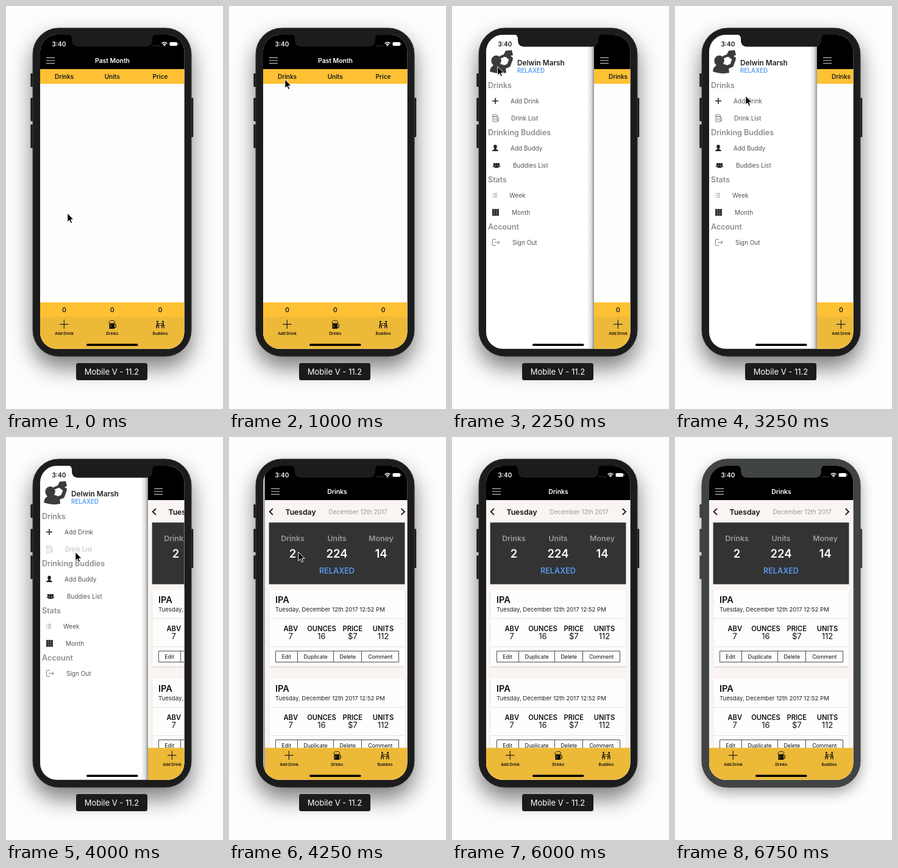
An HTML page that plays this animation: 356 px wide and 658 px high, repeating every 7.25 s.

```html
<!DOCTYPE html>
<html lang="en">
<head>
<meta charset="utf-8">
<title>Drink tracker demo</title>
<style>
  html, body { margin: 0; width: 100%; height: 100%; overflow: hidden; background: #fdfdfd; }
  svg { display: block; width: 356px; height: 658px; font-family: Inter, Roboto, "Liberation Sans", sans-serif; }
</style>
</head>
<body>
<svg id="stage" viewBox="0 0 356 658" xmlns="http://www.w3.org/2000/svg"></svg>
<script>
const LOOP = 7250, STEP = 250, OPEN = 177;
const YELLOW = '#fec133', INK = '#111';

const text = (x, y, size, str, { weight = 400, fill = INK, anchor = 'middle' } = {}) =>
  `<text x="${x}" y="${y}" font-size="${size}" font-weight="${weight}" fill="${fill}" text-anchor="${anchor}">${str}</text>`;
const left = (x, y, size, str, style) => text(x, y, size, str, { ...style, anchor: 'start' });
const rect = (x, y, w, h, fill, more = '') =>
  `<rect x="${x}" y="${y}" width="${w}" height="${h}" fill="${fill}" ${more}/>`;
const line = (d, stroke, width = 1, more = '') =>
  `<path d="${d}" fill="none" stroke="${stroke}" stroke-width="${width}" ${more}/>`;
const shape = (d, fill, more = '') => `<path d="${d}" fill="${fill}" ${more}/>`;
const group = (body, more = '') => `<g ${more}>${body}</g>`;
const at = (x, y, body) => group(body, `transform="translate(${x} ${y})"`);
const row = (centers, labels, draw) => labels.map((label, i) => draw(centers[i], label)).join('');

const COLS = [95.5, 174.2, 253];

// Icons, each centred on its own origin
const person = shape('M-5 5q0-2.3 3.4-3.1v-1.2q-1.2-1-1.2-3.1q0-3 2.8-3t2.8 3q0 2.1-1.2 3.1v1.2q3.4.8 3.4 3.1z', '#222');
const icons = {
  plus: (r, w) => line(`M${-r} 0H${r}M0 ${-r}V${r}`, '#222', w),
  mug: shape('M-4.500-1.500h8.500v8.500h-8.500z', INK) +
    line('M4-.5h1.2q1 0 1 1v3.500q0 1-1 1H4', INK, 1.2) +
    line('M-4.500-1.500q-2.500-2.500.5-3.500q1-2 3.500-1.300q3-1 4.500 1q2 1 0 3.300z', INK, .9) +
    line('M-2 .5v4.500', '#d8a62f', .6),
  mugOutline: line('M-4-2.5h7.5v8.5h-7.5zM3.5-.5h2v5h-2M-1.7-.5v4.5M1.2-.5v4.5M-4.5-3q-1.2-2.8 1.4-2.6q2.6-1.6 4.4 0q3.2 0 2.2 2.6z', '#777', .9),
  buddies: [-1, 1].map(s => group(
    `<circle cx="-4.6" cy="-4.5" r="1.4" fill="${INK}"/>` +
    line('M-5.2-2.600V2H-3L-2.600 6.200M-5.800 1L-6.200 6.200M-5-1.8L-2.8-.6L-.9-2', INK, 1.3),
    `transform="scale(${s} 1)"`)).join('') + line('M-2 1.5H2', INK, .8),
  person,
  people: group(person, 'transform="translate(-3.6 -.3) scale(.62)"') +
    group(person, 'transform="translate(3.6 -.3) scale(.62)"') +
    group(person, 'transform="translate(0 .4) scale(.78)"'),
  list: [-3, 0, 3].map(y => line(`M-4 ${y}h1.2M-1.5 ${y}h5.5`, '#777', .9)).join(''),
  grid: rect(-5.5, -5.5, 11, 11, '#222') + line('M-5.5-2H5.5M-5.5 2H5.5M-2-5.5V5.5M2-5.5V5.5', '#aaa', .5),
  exit: line('M0-5h-4.5q-1.2 0-1.2 1.2v7.6q0 1.2 1.2 1.2H0M-2 0H6M3.5-2.5L6 0L3.5 2.5', '#666', .9),
};

function drawMenu() {
  const head = (y, label) => left(59, y, 12.5, label, { weight: 600, fill: '#8e8e8e' });
  const item = (x, y, label, iconX, icon, id = '') => group(
    at(iconX, y - 4, icon) + left(x, y, 10, label, { fill: '#555' }), id);
  const drinker =
    shape('M62 107q1-8 6-10q-5-5-3-11q3-6 10-5q5 2 6 8l-2 6q6 0 9 5l1 9q-14 3-27-2z', '#3b3b3b') +
    line('M80 102L93 97L97 86L91 82', '#3b3b3b', 6, 'stroke-linejoin="round"') +
    shape('M78 82l7-3l3-6l10-1l2 8l-9 4l-5-1l-7 3z', '#3b3b3b');
  return rect(56, 47, 237, 513, '#fff') + drinker +
    left(107, 96.5, 11.8, 'Delwin Marsh', { weight: 600, fill: '#222' }) +
    left(107, 109, 9.8, 'RELAXED', { weight: 600, fill: '#5a9df2' }) +
    head(134, 'Drinks') +
    item(96, 159, 'Add Drink', 71, icons.plus(5, 1.6)) +
    item(97, 187, 'Drink List', 71, icons.mugOutline, 'id="drinkList"') +
    head(211, 'Drinking Buddies') +
    item(96, 236, 'Add Buddy', 71, icons.person) +
    item(100, 264, 'Buddies List', 73, icons.people) +
    head(288, 'Stats') +
    item(94, 313, 'Week', 70, icons.list) +
    item(98, 341, 'Month', 71.5, icons.grid) +
    head(365, 'Account') +
    item(99, 390, 'Sign Out', 72, icons.exit);
}

function drawMonth() {
  const bold = { weight: 600, fill: '#1c1c1c' };
  return rect(56, 103, 237, 457, '#fefefe') +
    rect(56, 103, 237, 24, YELLOW) +
    row(COLS, ['Drinks', 'Units', 'Price'], (x, s) => text(x, 118.5, 10, s, bold)) +
    rect(56, 484, 237, 24, YELLOW) +
    row(COLS, ['0', '0', '0'], (x, s) => text(x, 499.5, 10.4, s, bold)) +
    text(174.5, 93, 10.4, 'Past Month', { weight: 600, fill: '#fff' });
}

function drawCard(y) {
  const facts = [98.3, 149, 199.8, 250], buttons = [91, 139, 191.8, 245.3];
  return at(0, y,
    rect(63.5, 1, 221.5, 126, '#000', 'opacity=".1" filter="url(#soft)"') +
    rect(63.5, 0, 221.5, 125, '#fdfdfc') +
    left(73, 22.3, 14.6, 'IPA', { weight: 600 }) +
    left(73, 35.5, 9.6, 'Tuesday, December 12th 2017 12:52 PM', { fill: '#222' }) +
    line('M64 47.5H285M64 93.5H285', '#e6e4e3') +
    row(facts, ['ABV', 'OUNCES', 'PRICE', 'UNITS'], (x, s) => text(x, 68, 11.2, s, { weight: 600 })) +
    row(facts, ['7', '16', '$7', '112'], (x, s) => text(x, 81, 13, s)) +
    line('M73.5 100.5H275.5V118.5H73.5ZM109.5 100V118M168.5 100V118M214.5 100V118', '#3c3c3c', .9) +
    row(buttons, ['Edit', 'Duplicate', 'Delete', 'Comment'], (x, s) => text(x, 112.7, 8.8, s)));
}

function drawDrinks() {
  const cols = [101.5, 174, 246.5];
  return rect(56, 103, 237, 457, '#faf4f2') +
    line('M69 116.8L63.6 122L69 127.2M279.6 116.8L285 122L279.6 127.2', '#111', 1.8) +
    left(89.5, 127, 12.2, 'Tuesday', { weight: 600 }) +
    left(160.5, 126, 10, 'December 12th 2017', { fill: '#999' }) +
    rect(62.6, 139.6, 222.8, 100.8, '#333') +
    row(cols, ['Drinks', 'Units', 'Money'], (x, s) => text(x, 169.5, 12.4, s, { weight: 600, fill: '#999' })) +
    row(cols, ['2', '224', '14'], (x, s) => text(x, 197, 18.4, s, { weight: 600, fill: '#fff' })) +
    text(174, 223, 12.6, 'RELAXED', { weight: 600, fill: '#5b97ec' }) +
    drawCard(249) + drawCard(394) +
    text(174.5, 93, 10.4, 'Drinks', { weight: 600, fill: '#fff' });
}

function drawContent() {
  return rect(44, 47, 12, 513, 'url(#edge)', 'id="edgeShadow"') +
    rect(56, 47, 237, 56, '#000') +
    group(drawMonth(), 'id="month"') + group(drawDrinks(), 'id="drinks"') +
    line('M66 84.5H80M66 89H80M66 93.5H80', '#ddd', 1.1) +
    rect(56, 507.5, 237, 52.5, '#ecb938') +
    at(95.3, 519.7, icons.plus(7.2, 1.2)) + at(174, 520, icons.mug) + at(253, 520, icons.buddies) +
    row(COLS, ['Add Drink', 'Drinks', 'Buddies'], (x, s) => text(x, 536.5, 6.4, s, { weight: 600 }));
}

function drawStatus() {
  const dots = [242.5, 245.5, 248.5, 251.5].map(x => `<circle cx="${x}" cy="65" r=".8" fill="#666"/>`).join('');
  return left(75.5, 65.5, 10, '3:40', { weight: 600, fill: 'currentColor' }) +
    group(dots +
      line('M255.6 61.3Q260 57.2 264.4 61.3M257.4 63.2Q260 60.9 262.6 63.2', '#fff', 1.5) +
      shape('M258.4 64.2Q260 63 261.6 64.2L260 66z', '#fff') +
      rect(268.5, 59, 12.5, 6, '#fff', 'rx="1.6"') +
      rect(281.8, 60.8, 1.1, 2.4, '#aaa', 'rx=".5"'), 'id="signals"');
}

const stage = document.getElementById('stage');
stage.innerHTML = `<defs>
    <clipPath id="screen">${rect(56, 47, 236.4, 512.7, '#000', 'rx="27"')}</clipPath>
    <linearGradient id="edge"><stop offset="0" stop-opacity="0"/><stop offset=".6" stop-opacity=".12"/><stop offset="1" stop-opacity=".42"/></linearGradient>
    <filter id="soft"><feGaussianBlur stdDeviation="1.5"/></filter>
    <filter id="wide" x="-40%" y="-20%" width="180%" height="140%"><feGaussianBlur stdDeviation="18"/></filter>
    <filter id="narrow" x="-40%" y="-20%" width="180%" height="140%"><feGaussianBlur stdDeviation="11"/></filter>
  </defs>` +
  rect(0, 0, 356, 658, '#fdfdfd') +
  rect(44, 53, 260, 537, '#000', 'id="activeShadow" rx="42" opacity=".52" filter="url(#wide)"') +
  rect(44, 43, 260, 537, '#000', 'id="idleShadow" rx="42" opacity=".36" filter="url(#narrow)"') +
  group(
    [[40.3, 110, 22], [40.3, 150, 38], [40.3, 193.5, 38.5], [301.2, 150, 64]]
      .map(([x, y, h]) => rect(x, y, 6, h, 'currentColor', 'rx="1"')).join('') +
    rect(44, 36, 260, 536, 'currentColor', 'rx="42.5" stroke="#3a3a3a" stroke-width="1"'), 'id="body"') +
  group(drawMenu() + group(drawContent(), 'id="content"') + group(drawStatus(), 'id="status"') +
    shape('M102 46.5q5 .5 6 6v3q0 11 11 11h110q11 0 11-11v-3q1-5.500 6-6z', 'currentColor', 'id="notch"') +
    rect(132, 551.5, 84.500, 3.4, '#000', 'rx="1.7"'), 'clip-path="url(#screen)"') +
  group(rect(115, 583, 117, 28, '#1b1b1b', 'rx="3.500"') +
    text(173.5, 602, 13, 'Mobile V - 11.2', { fill: '#fff' }), 'id="label"') +
  group(shape('M.8.8V15.200L4.100 12.200L6.300 17.300L8.600 16.300L6.500 11.300H11z', '#000', 'stroke="#fff" stroke-width="1" stroke-linejoin="round"'), 'id="cursor"');

const el = Object.fromEntries([...stage.querySelectorAll('[id]')].map(node => [node.id, node]));

// [time, x, y]: the pointer jumps between these places
const POINTER = [
  [0, 100, 337.5], [750, 95, 187], [1000, 91, 119], [1250, 80, 99], [1500, 74, 99], [1750, 74, 98],
  [2750, 95, 136], [3000, 104, 140], [3250, 115, 146], [3500, 123, 167], [3750, 113, 187],
  [5000, 138, 193], [5250, 155, 215], [5500, 173, 308], [5750, 336, 416],
];
const DRAWER = [[0, 0], [2250, OPEN], [4250, 3], [4500, 0]];
const latest = (keys, t) => keys.filter(key => key[0] <= t).pop();
const show = (node, on) => node.setAttribute('display', on ? 'inline' : 'none');

function render(time) {
  const t = Math.floor((time % LOOP) / STEP) * STEP;
  const [, x, y] = latest(POINTER, t);
  const [, offset] = latest(DRAWER, t);
  const drawerOpen = offset > OPEN / 2, idle = t >= 6750;

  el.cursor.setAttribute('transform', `translate(${x} ${y})`);
  show(el.cursor, t < 6000);
  el.content.setAttribute('transform', `translate(${offset} 0)`);
  show(el.edgeShadow, offset > 0);
  show(el.month, t < 4000);
  show(el.drinks, t >= 4000);
  el.drinkList.setAttribute('opacity', t === 4000 ? .4 : 1);
  el.status.setAttribute('color', drawerOpen ? '#111' : '#fff');
  show(el.signals, !drawerOpen);

  const bezel = idle ? '#414445' : '#1c1c1c';
  el.body.setAttribute('color', bezel);
  el.notch.setAttribute('color', bezel);
  show(el.activeShadow, !idle);
  show(el.idleShadow, idle);
  show(el.label, !idle);
}

let start;
function tick(now) {
  start ??= now;
  render(now - start);
  requestAnimationFrame(tick);
}
render(0);
requestAnimationFrame(tick);
</script>
</body>
</html>
```
